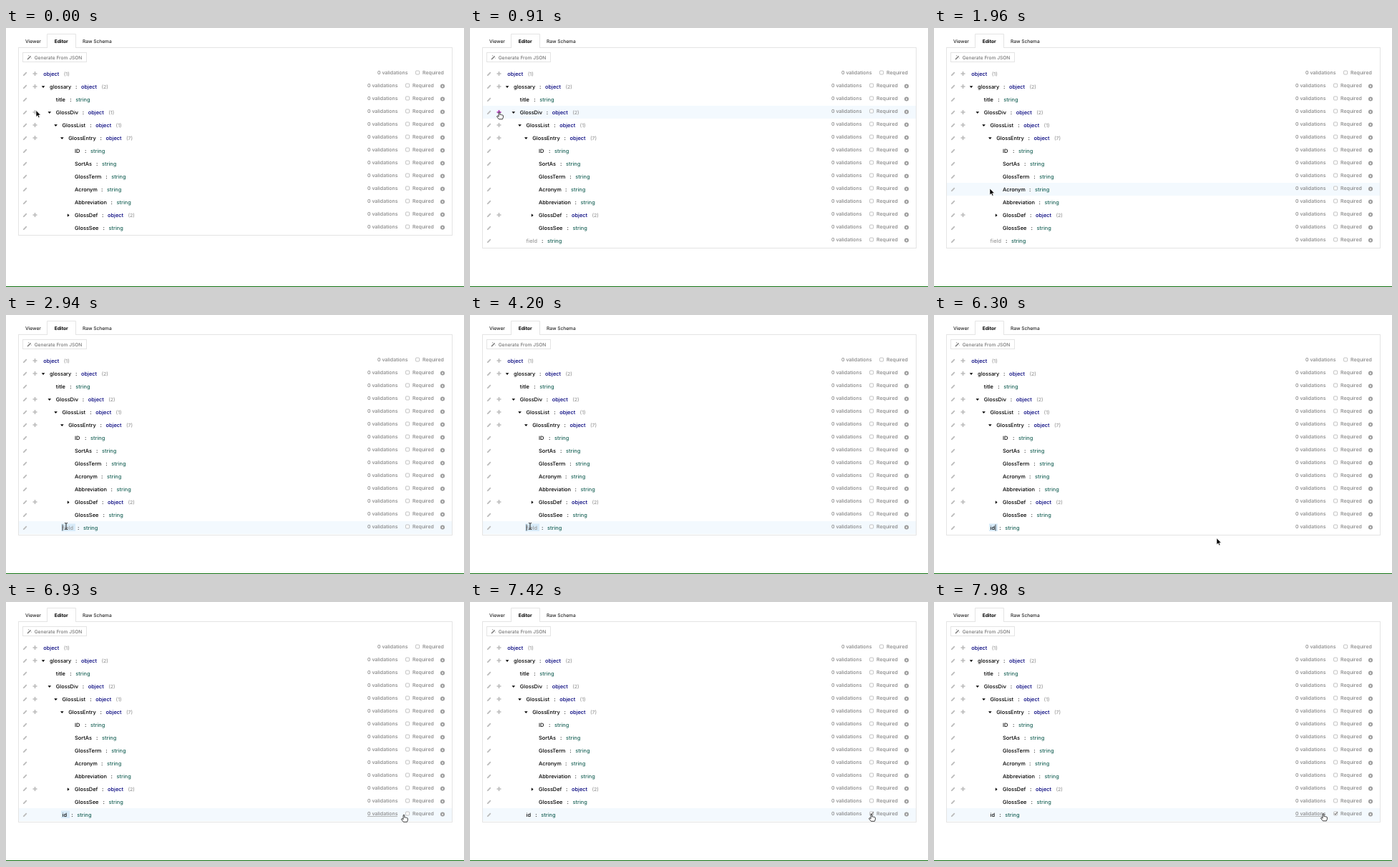
These frames come from a looping animation (640 by 363 pixels, 8 s). An HTML page:

```html
<!DOCTYPE html>
<html lang="en">
<head>
<meta charset="utf-8">
<title>Schema editor</title>
<style>
html, body { margin: 0; width: 100%; height: 100%; overflow: hidden; background: #fff; }
svg { display: block; width: 640px; height: 363px; }
text { font: 450 7.4px Inter, Roboto, sans-serif; fill: #000; text-rendering: geometricPrecision; white-space: pre; }
.tab, .tool { font-size: 6.6px; }
.tab { fill: #222; }
.active { font-weight: 700; fill: #000; }
.tool { fill: #777; }
.colon { font-weight: 600; fill: #222; }
.object { fill: #00007c; }
.string { fill: #1f665b; }
.count { fill: #999; font-size: 7px; }
.side { fill: #858585; font-size: 7px; }
.muted { fill: #999; }
.line { fill: none; stroke: #e4e4e4; }
.icon { fill: #bbb; }
.check { fill: #fff; stroke: #aaa; stroke-width: .7; }
</style>
</head>
<body>
<svg id="stage" viewBox="0 0 640 363">
  <defs>
    <path id="pencil" class="icon" d="M-2.9 3l.5-1.9L1.4-2.8 2.7-1.5-1.1 2.4z"/>
    <path id="plus" d="M-.8-3H.8V-.8H3V.8H.8V3H-.8V.8H-3V-.8H-.8z"/>
    <path id="down" d="M-2.3-1.2H2.3L0 1.5z"/>
    <path id="right" d="M-1.2-2.3V2.3L1.5 0z"/>
    <g id="remove">
      <circle r="3" fill="#999"/>
      <path d="M-1.1-1.1L1.1 1.1M1.1-1.1L-1.1 1.1" stroke="#fff" stroke-width="1"/>
    </g>
  </defs>
  <rect width="640" height="363" fill="#fff"/>
  <rect id="panel" class="line" x="17.5" y="27.5" width="606"/>
  <path d="M57.5 28V8.5H97.5V28" fill="#fff" stroke="#e4e4e4"/>
  <text class="tab" x="27" y="21">Viewer</text>
  <text class="tab active" x="67.7" y="21">Editor</text>
  <text class="tab" x="107" y="21">Raw Schema</text>
  <rect class="line" x="23.5" y="34.5" width="89" height="13"/>
  <path d="M30 44L34.6 39.4" stroke="#777" stroke-width="1.4"/>
  <path d="M31.6 38v1.6M30.8 38.8h1.6M35.4 41.6v1.4" stroke="#aaa" stroke-width=".7"/>
  <text class="tool" x="39.7" y="43.6">Generate From JSON</text>
  <rect id="hover" x="18" width="605" height="18" fill="#f3f9fe"/>
  <rect id="focus" x="77" y="292.5" height="10.5" fill="#d8ebf9"/>
  <g id="rows"></g>
  <path id="caret" stroke="#222" stroke-width=".8"/>
  <path id="underline" d="M505 300.5H547" stroke="#999" stroke-width=".7"/>
  <rect y="362" width="640" height="1" fill="#107010"/>
  <path id="arrow" d="M0 0V9L2.1 7.1 3.5 10.3 5 9.6 3.6 6.6H6.4z" fill="#000" stroke="#fff" stroke-width=".6"/>
  <path id="hand" d="M-.9.2Q0-.8.9.2V3.6Q1.8 2.9 2.5 3.8 3.4 3.2 4 4.2 5.2 3.7 5.4 5V7.3L4.4 9.8H-.6L-3.5 6.2Q-3.3 4.8-2 5.3L-.9 6.2z" fill="#fff" stroke="#111" stroke-width=".8"/>
  <path id="beam" d="M-2-4.5Q0-4.5 0-3.5 0-4.5 2-4.5M0-3.5V3.5M-2 4.5Q0 4.5 0 3.5 0 4.5 2 4.5" fill="none" stroke="#111" stroke-width=".9"/>
</svg>
<script>
const $ = id => document.getElementById(id);
const LOOP = 8000, TICK = 70, TOP = 64, STEP = 18;
const ADDED = 700, FOCUS = 2870, TYPE_I = 5040, TYPE_D = 5110, BLUR = 7350, CHECK = 7420;
const COLON = 8;

// name, depth, type x, child count, toggle
const tree = [
  ['', 0, 52.3, 1],
  ['glossary', 1, 105, 2, 'down'],
  ['title', 2, 97.3],
  ['GlossDiv', 2, 114.8, 1, 'down'],
  ['GlossList', 3, 125.2, 1, 'down'],
  ['GlossEntry', 4, 139.5, 7, 'down'],
  ['ID', 5, 118],
  ['SortAs', 5, 134],
  ['GlossTerm', 5, 147.3],
  ['Acronym', 5, 141],
  ['Abbreviation', 5, 154.5],
  ['GlossDef', 5, 142, 2, 'right'],
  ['GlossSee', 5, 143.5],
  ['field', 3, 108]
];

const label = (cls, x, y, str, extra = '') => `<text class="${cls}" x="${x}" y="${y}" ${extra}>${str}</text>`;
const use = (id, x, y, extra = '') => `<use href="#${id}" transform="translate(${x} ${y})" ${extra}/>`;

function row([name, depth, typeX, count, toggle], i) {
  const y = TOP + i * STEP, base = y + 2.7, x = 52.3 + depth * 8.75;
  const shift = i ? 0 : 14, type = count ? 'object' : 'string';
  let out = use('pencil', 26.7, y + .3);
  if (count) out += use('plus', 40.5, y, `class="icon" id="plus${i}"`);
  if (toggle) out += use(toggle, x - 9, y + .5);
  if (name) out += label('name', x, base, name) + label('colon', typeX - COLON, base, ':');
  out += label(type, typeX, base, type);
  if (count) out += label('count', typeX + 28.4, base, `(${count})`, `id="count${i}"`);
  out += label('side', 505 + shift, base - 1.4, '0 validations');
  out += `<rect class="check" x="${558.6 + shift}" y="${y - 4}" width="5" height="5" rx="1"/>`;
  out += label('side', 568 + shift, base - 1.4, 'Required');
  if (i) out += use('remove', 610, y - .4);
  return `<g id="row${i}">${out}</g>`;
}

$('rows').innerHTML = tree.map(row).join('');
const last = $('row13');
last.insertAdjacentHTML('beforeend', '<path id="tick" d="M559.6 296.5l1.4 1.5 3-4" fill="none" stroke="#777" stroke-width="1.1"/>');
const [field, colon, type] = ['.name', '.colon', '.string'].map(s => last.querySelector(s));

// time, x, y of the pointer
const path = [
  [0, 42, 115.5], [70, 42, 115.5], [350, 41, 118], [1260, 41, 118], [1600, 55, 160],
  [1960, 78, 225], [2170, 83, 285], [2450, 84, 296], [5180, 84, 296],
  [5600, 106, 303], [5810, 165, 313], [6090, 290, 315], [6370, 430, 312],
  [6650, 530, 304], [6930, 556, 298.5], [7140, 561, 297.5], [7700, 561, 297.5], [7980, 544, 297]
];

function pointer(t) {
  const n = path.findIndex(p => p[0] > t);
  if (n < 0) return path[path.length - 1].slice(1);
  const [a, b] = [path[n - 1], path[n]], k = (t - a[0]) / (b[0] - a[0]);
  return [a[1] + (b[1] - a[1]) * k, a[2] + (b[2] - a[2]) * k];
}

function shape(t) {
  if (t >= 560 && t < 1330 || t >= 6650) return 'hand';
  if (t >= 2450 && t < 4760) return 'beam';
  return t >= 4760 && t < 5250 ? '' : 'arrow';
}

const show = (el, on) => el.setAttribute('visibility', on ? 'visible' : 'hidden');

function render(t) {
  const [x, y] = pointer(t), kind = shape(t), added = t >= ADDED;
  for (const id of ['arrow', 'hand', 'beam']) {
    show($(id), id === kind);
    $(id).setAttribute('transform', `translate(${x} ${y})`);
  }

  const over = Math.round((y - TOP) / STEP);
  show($('hover'), t >= 560 && over < tree.length);
  $('hover').setAttribute('y', TOP - 9 + over * STEP);
  $('plus3').style.fill = kind === 'hand' && over === 3 ? '#b02ab8' : '';

  show(last, added);
  $('panel').setAttribute('height', added ? 281 : 263);
  $('count3').textContent = added ? '(2)' : '(1)';

  const value = t >= TYPE_D ? 'id' : t >= TYPE_I ? 'i' : '';
  const typeX = [108, 95, 99.3][value.length];
  field.textContent = value || 'field';
  field.classList.toggle('muted', !value);
  type.setAttribute('x', typeX);
  colon.setAttribute('x', typeX - COLON);

  const focused = t >= FOCUS && t < BLUR;
  const since = t - (t >= TYPE_D ? TYPE_D : FOCUS);
  show($('focus'), focused);
  $('focus').setAttribute('width', [20, 8, 12][value.length]);
  show($('caret'), focused && Math.floor(since / 530) % 2 === 0);
  $('caret').setAttribute('d', `M${[79, 81, 86][value.length]} 293.5v9`);

  show($('underline'), over === 13 && x > 503 && x < 557);
  show($('tick'), t >= CHECK);
}

function frame(now) {
  render(Math.floor(now % LOOP / TICK) * TICK);
  requestAnimationFrame(frame);
}
render(0);
requestAnimationFrame(frame);
</script>
</body>
</html>
```
